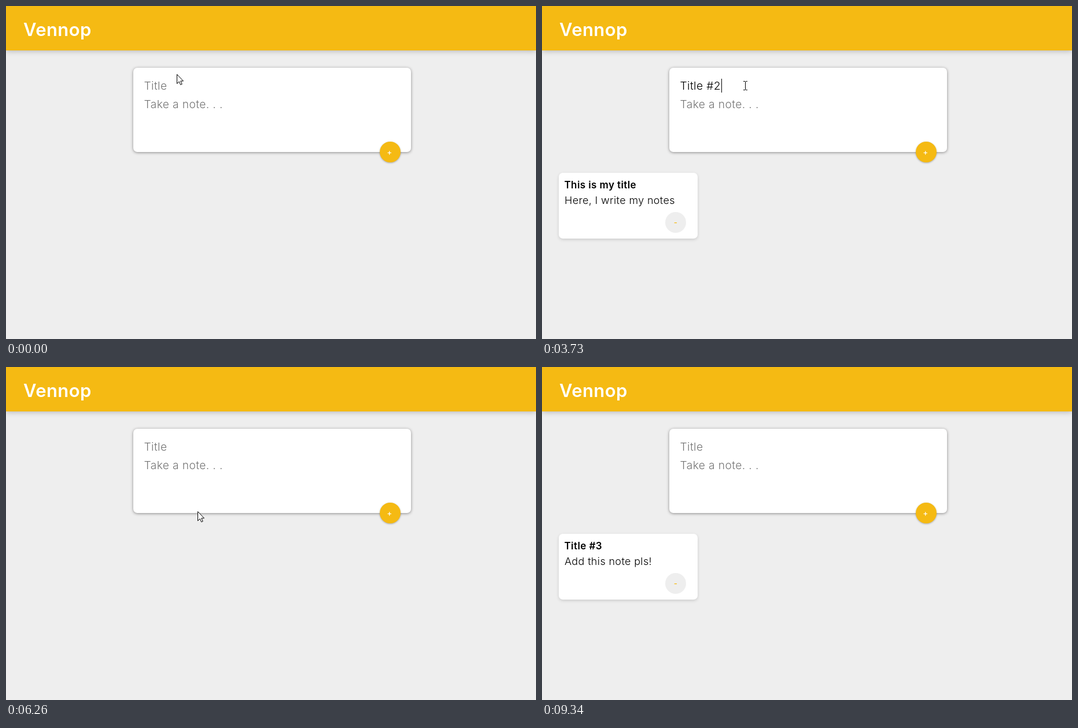
An HTML page with a canvas for the animation above (9400 ms loop, 916 px wide and 577 px high).

```html
<!DOCTYPE html>
<html lang="en">
<head>
<meta charset="utf-8">
<title>Notes</title>
<style>
  html, body { margin: 0; width: 100%; height: 100%; overflow: hidden; background: #eee; }
  canvas { display: block; width: 916px; height: 577px; }
</style>
</head>
<body>
<canvas id="stage" width="916" height="577"></canvas>
<script>
const ctx = document.getElementById('stage').getContext('2d');
const LOOP = 9400;
const AMBER = '#f5ba13';
const FONT = 'Inter, "Open Sans", sans-serif';
const FOCUS_LEAD = 60;
const RADIUS = 18;

const point = (x, y) => ({ x, y });
const PLUS = point(664, 253);
const minusOf = slot => point(231 + slot * 272, 375);

const field = (text, start, step) =>
  ({ text, start, step, focus: start - FOCUS_LEAD, end: start + text.length * step });

// Each draft is typed into the form, saved as a card and possibly deleted.
const drafts = [
  { title: field('This is my title', 115, 47),
    note: field('Here, I write my notes', 925, 64), saved: 2660, removed: 5830 },
  { title: field('Title #2', 3160, 70),
    note: field('More notes go here :)', 3870, 33), saved: 4830, removed: 6040 },
  { title: field('Title #3', 6760, 75),
    note: field('Add this note pls!', 7440, 46), saved: 8820, removed: LOOP },
];
const [first, second, third] = drafts;

// The pointer glides between a few resting places, sometimes along a sagging arc.
const REST = point(295, 118);
const TITLE = point(351, 138);
const ADD = point(675, 253);
const REMOVE = point(240, 379);
const EXIT = point(748, 544);
const glide = (start, duration, to, sag = 0) => ({ start, duration, to, sag });
const glides = [
  glide(first.title.focus, 120, point(297, 129)),
  glide(first.note.end, 280, ADD),
  glide(first.saved + 40, 250, TITLE),
  glide(second.note.end, 210, ADD),
  glide(second.saved + 70, 750, REMOVE, 50),
  glide(second.removed + 10, 290, TITLE, 90),
  glide(third.note.end, 440, ADD),
  glide(third.saved + 80, 420, EXIT),
];

const arrowPath = new Path2D('M.5 .5V16.5L4.2 13L6.7 18.5L9.2 17.4L6.8 12H11.5Z');
const handPath = new Path2D('M-2 1.8Q-2 .5-.4 .5Q1.2 .5 1.2 1.8V8Q3.3 6.6 4.5 8.6Q6.8 7.5 7.8 9.5' +
  'Q10.5 9 10.5 12V16Q10.2 19.5 8.5 21V23.5H0V21Q-2.5 18.5-5.2 14Q-6 11.2-3.6 12L-2 13.8Z');
const fingerLines = new Path2D('M1.2 8V11.5M4.5 8.6V11.5M7.8 9.5V12');
const beamPath = new Path2D('M-3-7.5H0M1-7.5H4M-3 7.5H0M1 7.5H4M.5-7V7');

function shadowed(offset, blur, color, draw) {
  ctx.save();
  ctx.shadowOffsetY = offset;
  ctx.shadowBlur = blur;
  ctx.shadowColor = color;
  draw();
  ctx.restore();
}

function panel(x, y, w, h) {
  ctx.fillStyle = '#fff';
  ctx.beginPath();
  ctx.roundRect(x, y, w, h, 7);
  ctx.fill();
}

function disc({ x, y }, color) {
  ctx.fillStyle = color;
  ctx.beginPath();
  ctx.arc(x, y, RADIUS, 0, Math.PI * 2);
  ctx.fill();
}

function write(text, x, y, size, color, weight = 300, align = 'left') {
  ctx.font = `${weight} ${size}px ${FONT}`;
  ctx.letterSpacing = '0.4px';
  ctx.textAlign = align;
  ctx.fillStyle = color;
  ctx.fillText(text, x, y);
}

function typed({ text, start, step }, t) {
  const count = t < start ? 0 : Math.floor((t - start) / step) + 1;
  return text.slice(0, count);
}

function drawInput(text, placeholder, y, focused) {
  write(text || placeholder, 238.5, y, 19.2, text ? '#000' : '#757575');
  if (!focused) return;
  const x = Math.round(239 + ctx.measureText(text).width);
  ctx.fillStyle = '#000';
  ctx.fillRect(x, y - 19, 1, 24);
}

function drawForm(t) {
  shadowed(1, 5, 'rgb(138,137,137)', () => panel(220, 107, 480, 146));
  const draft = drafts.find(d => t >= d.title.focus && t < d.saved);
  const inNote = draft && t >= draft.note.focus;
  drawInput(draft ? typed(draft.title, t) : '', 'Title', 145, draft && !inNote);
  drawInput(draft ? typed(draft.note, t) : '', 'Take a note. . .', 177, inNote);
  shadowed(1, 3, 'rgba(0,0,0,.3)', () => disc(PLUS, AMBER));
  write('+', PLUS.x - 1, PLUS.y + 5, 13.3, '#fff', 500, 'center');
}

function drawCard(draft, slot) {
  const minus = minusOf(slot);
  const x = minus.x - 202;
  shadowed(2, 5, '#ccc', () => panel(x, 289, 240, 114));
  write(draft.title.text, x + 9.5, 316, 17, '#000', 600);
  write(draft.note.text, x + 10, 343, 17.9, '#000');
  disc(minus, '#eee');
  write('-', minus.x, minus.y + 5, 13.3, AMBER, 500, 'center');
}

function pointerAt(t) {
  let at = REST;
  for (const { start, duration, to, sag } of glides) {
    if (t < start) break;
    const k = Math.min(1, (t - start) / duration);
    const e = k * k * (3 - 2 * k);
    at = point(at.x + (to.x - at.x) * e,
               at.y + (to.y - at.y) * e + sag * Math.sin(Math.PI * k));
  }
  return point(Math.round(at.x), Math.round(at.y));
}

function drawPointer(p, cards) {
  const over = c => Math.hypot(p.x - c.x, p.y - c.y) < RADIUS;
  const overButton = over(PLUS) || cards.some((_, slot) => over(minusOf(slot)));
  const overInput = p.x > 235 && p.x < 685 && p.y > 121 && p.y < 238;
  ctx.save();
  ctx.translate(p.x, p.y);
  ctx.strokeStyle = '#000';
  ctx.fillStyle = '#fff';
  if (overInput && !overButton) {
    ctx.stroke(beamPath);
  } else {
    const shape = overButton ? handPath : arrowPath;
    ctx.fill(shape);
    ctx.stroke(shape);
    if (overButton) ctx.stroke(fingerLines);
  }
  ctx.restore();
}

function render(t) {
  ctx.fillStyle = '#eee';
  ctx.fillRect(0, 0, 916, 577);
  shadowed(0, 10, 'rgba(0,0,0,.3)', () => {
    ctx.fillStyle = AMBER;
    ctx.fillRect(0, 0, 916, 77);
  });
  write('Vennop', 30, 52, 31, '#fff', 600);
  drawForm(t);
  const cards = drafts.filter(d => t >= d.saved && t < d.removed);
  cards.forEach(drawCard);
  const pointer = pointerAt(t);
  if (pointer.y < EXIT.y) drawPointer(pointer, cards);
}

const began = performance.now();
function tick() {
  render((performance.now() - began) % LOOP);
  requestAnimationFrame(tick);
}
tick();
</script>
</body>
</html>
```
